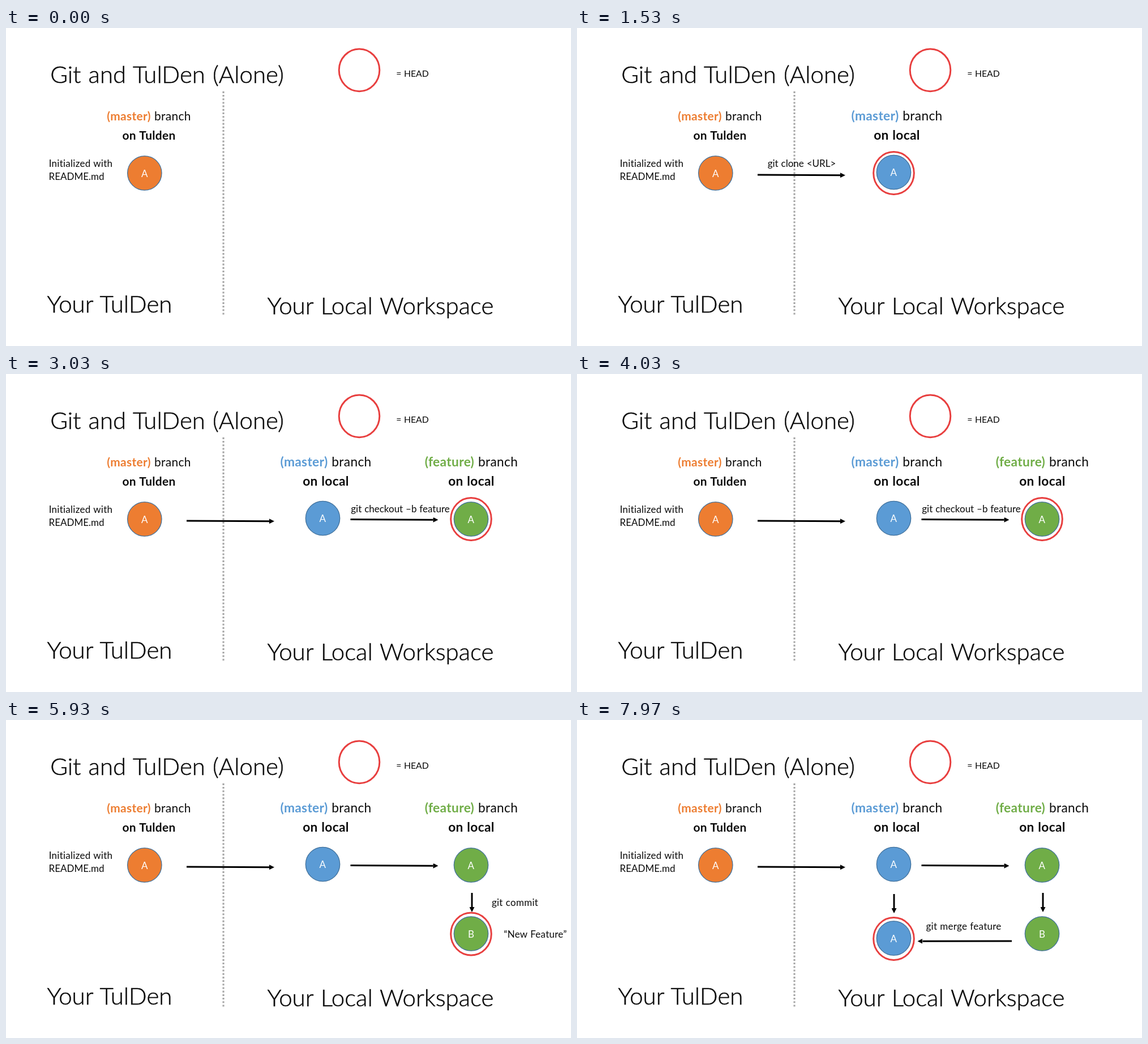
Write an HTML page that moves like this. It is 998 px wide and 561 px high and loops after 8000 ms.

```html
<!DOCTYPE html>
<html lang="en">
<head>
<meta charset="utf-8">
<title>Git and TulDen (Alone)</title>
<style>
html, body { margin: 0; width: 100%; height: 100%; overflow: hidden; background: #fff; }
svg { display: block; width: 998px; height: 561px; }
text { font: 17px Lato, Carlito, sans-serif; letter-spacing: .015em; word-spacing: .03em; text-anchor: middle; fill: #0b0b0b; }
.title { font-size: 42px; font-weight: 300; letter-spacing: 0; word-spacing: .04em; stroke: #0b0b0b; stroke-width: .5; }
.tight { letter-spacing: 0; }
.caps { font-size: 15.8px; letter-spacing: 0; }
.remote { font-size: 20.9px; }
.local { font-size: 22.7px; }
.bold { font-weight: 700; }
.label { fill: #fff; }
.node { stroke: #41719c; stroke-width: 1.3; }
.arrow { stroke: #000; stroke-width: 3; marker-end: url(#head); }
.ring { fill: none; stroke: #e83f3f; stroke-width: 3; }
.divider { stroke: #a5a5a5; stroke-width: 3.1; stroke-dasharray: 3.1; }
</style>
</head>
<body>
<svg id="stage" viewBox="0 0 998 561"></svg>
<script>
const LOOP = 8000;
const STEP_STARTS = [0, 1530, 3000, 4530, 6000, 7530];
const ORANGE = '#ed7d31', BLUE = '#5b9bd5', GREEN = '#70ad47';
const stage = document.getElementById('stage');

const text = (x, y, content, cls = '') => `<text x="${x}" y="${y}" class="${cls}">${content}</text>`;
const branch = (x, name, color, cls, place) =>
  text(x, 162.5, `<tspan class="bold" fill="${color}">(${name})</tspan> branch`, cls) +
  text(x, 197, `on ${place}`, cls + ' bold');
const node = (x, y, letter, color) =>
  `<circle class="node" cx="${x}" cy="${y}" r="30.2" fill="${color}"/>` + text(x, y + 6.5, letter, 'label');
const ring = (x, y) => `<ellipse class="ring" cx="${x}" cy="${y}" rx="35.8" ry="37.4"/>`;
// The end point is the base of the arrow head.
const arrow = (x1, y1, x2, y2) => `<line class="arrow" x1="${x1}" y1="${y1}" x2="${x2}" y2="${y2}"/>`;
// A group shown from step `first` through step `last`.
const during = (first, last, ...parts) =>
  `<g data-first="${first}" data-last="${last}">${parts.join('')}</g>`;

stage.innerHTML = [
  `<defs><marker id="head" markerWidth="3" markerHeight="3" refY="1.5" orient="auto">
    <path d="M0 0L3 1.5L0 3z"/></marker></defs>`,
  '<line class="divider" x1="384" y1="111.8" x2="384" y2="508"/>',
  text(284.5, 97, 'Git and TulDen (Alone)', 'title'),
  text(183, 502, 'Your TulDen', 'title'),
  text(661.5, 505, 'Your Local Workspace', 'title'),
  ring(624, 74.3),
  text(718, 86, '= HEAD', 'caps'),
  branch(252.5, 'master', ORANGE, 'remote', 'Tulden'),
  text(132, 245, 'Initialized with'),
  text(124.5, 267.5, 'README.md', 'tight'),
  node(244.8, 256, 'A', ORANGE),
  during(1, 5,
    branch(565, 'master', BLUE, 'local', 'local'),
    node(559.5, 254.5, 'A', BLUE),
    arrow(319, 259, 465, 259.7)),
  during(1, 1, text(397, 245, 'git clone &lt;URL&gt;', 'tight'), ring(559.5, 256)),
  during(2, 5,
    branch(822, 'feature', GREEN, 'local', 'local'),
    node(821.5, 256, 'A', GREEN),
    arrow(608.5, 256.5, 754.5, 257.2)),
  during(2, 2, text(696.5, 244, 'git checkout –b feature', 'tight'), ring(821.5, 256)),
  during(3, 5, node(821.5, 377, 'B', GREEN), arrow(823, 305, 823, 330)),
  during(3, 3,
    text(899, 327.5, 'git commit'),
    text(935, 383.5, '“New Feature”'),
    ring(821.5, 377.5)),
  during(4, 4, text(577.5, 315.5, 'git checkout master'), ring(559.5, 257)),
  during(5, 5,
    node(559.5, 385, 'A', BLUE),
    arrow(560, 307, 560, 332),
    arrow(768, 390, 610.5, 390.2),
    text(683, 370, 'git merge feature'),
    ring(559.5, 386))
].join('');

const groups = [...stage.querySelectorAll('g')];

function draw(now) {
  const time = now % LOOP;
  const step = STEP_STARTS.filter(start => start <= time).length - 1;
  for (const g of groups) {
    const visible = step >= g.dataset.first && step <= g.dataset.last;
    g.style.display = visible ? '' : 'none';
  }
  requestAnimationFrame(draw);
}
draw(performance.now());
</script>
</body>
</html>
```
